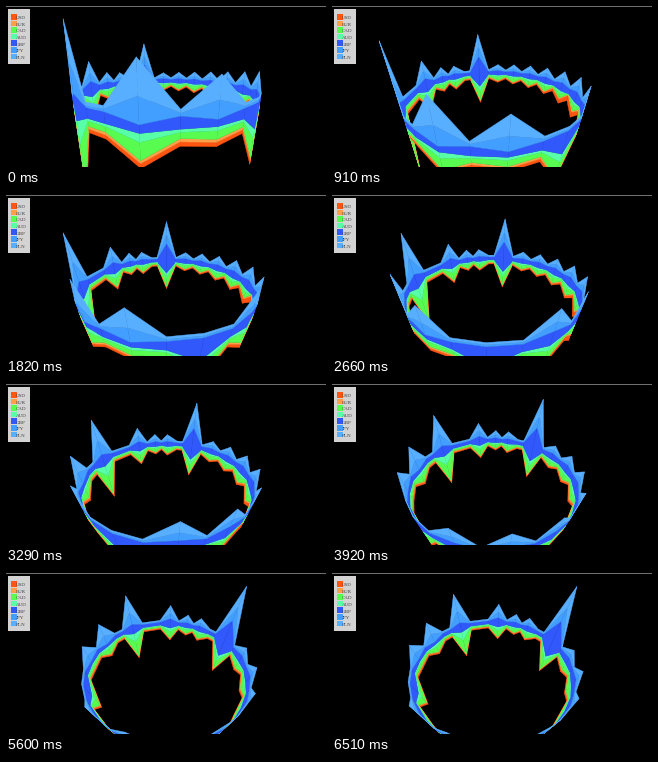
Animation of 320x161 px, one loop 7210 ms. Source, as a matplotlib script:

```python
import numpy as np
import matplotlib.pyplot as plt
from matplotlib.animation import FuncAnimation
from matplotlib.collections import PolyCollection
from matplotlib.patches import Rectangle

W, H, DPI = 320, 161, 100
FRAMES, STEP = 103, 70
FOCAL, DIST = 110, 1.53
CX, CY = 160.5, 80.5
REACH = 12  # widest half base of a spike, degrees

NAMES = ["USD", "EUR", "CAD", "AUD", "GBP", "JPY", "PLN"]
COLORS = ["#ff5511", "#ff9f4a", "#58fb50", "#58ffa8", "#3058fa", "#429eff", "#58aeff"]

# angle, rise, drop, share of blue
SPIKES = [
    (-168, .17, .03, -.2),
    (-144, .25, .14, -.2),
    (-111, .51, .63, .12),
    (-66, .29, .28, .25),
    (-46, .14, .10, .2),
    (-31, .13, .14, .2),
    (0, .71, .59, .46),
    (168, .00, .33, .4),
]
SPIKES += [(a, .10 + a / 2000, .08 + a / 2000, .2) for a in range(24, 150, 20)]
SPIKES.sort()

# camera path: step, turn, elevation
PATH = np.array([
    (0, -28, 9), (13, -17, 19.5), (26, 0, 21.5), (38, 14, 24),
    (56, 50, 33), (69, 68.5, 39), (88, 72, 41.6), (91, 72, 41.6), (93, 72.8, 42),
])


def build_ring():
    """Angles of all spikes and valleys, and the layer bounds there."""
    knots = []
    first = SPIKES[0]
    for cur, nxt in zip(SPIKES, SPIKES[1:] + [(first[0] + 360,) + first[1:]]):
        reach = min((nxt[0] - cur[0]) / 2, REACH)
        knots += [cur, (cur[0] + reach, 0, 0, 0)]
        if reach == REACH and nxt[0] - cur[0] > 2 * REACH:
            knots.append((nxt[0] - reach, 0, 0, 0))
    knots.append((first[0] + 360,) + first[1:])

    angle, rise, drop, share = np.array(knots, float).T
    top = .045 + rise
    bottom = -.155 - drop
    blue_top = .01 + share * rise
    blue_low = -.06 - np.abs(share) * drop
    red = bottom + .025 + .04 * drop + .05 * np.exp(-((angle - 115) / 20) ** 2)
    orange = red + .018
    green = blue_low - .32 * (blue_low - orange)
    sky = blue_top + .45 * (top - blue_top)
    return angle, np.array([bottom, red, orange, green, blue_low, blue_top, sky, top])


ANGLES, BOUNDS = build_ring()


def project(turn, tilt):
    theta = np.radians(ANGLES + turn)
    s, c = np.sin(np.radians(tilt)), np.cos(np.radians(tilt))
    depth = DIST + np.cos(theta) * c - BOUNDS * s
    x = CX + FOCAL * np.sin(theta) / depth
    y = CY - FOCAL * (BOUNDS * c + np.cos(theta) * s) / depth
    return np.stack([x, y], axis=-1), np.cos((theta[:-1] + theta[1:]) / 2)


fig = plt.figure(figsize=(W / DPI, H / DPI), dpi=DPI, facecolor="black")
ax = fig.add_axes([0, 0, 1, 1])
ax.set_xlim(0, W)
ax.set_ylim(H, 0)
ax.axis("off")

ring = PolyCollection([], linewidths=.3)
ax.add_collection(ring, autolim=False)

ax.add_patch(Rectangle((0, 0), W, 1, fc="#707070", ec="none"))
ax.add_patch(Rectangle((2, 3), 22, 55, fc="#d3d3d3", ec="none", zorder=3))
for i, (name, color) in enumerate(zip(NAMES, COLORS)):
    y = 10.8 + 6.6 * i
    ax.add_patch(Rectangle((5, y - 2.8), 5.5, 5.6, fc=color, ec="none", zorder=4))
    ax.text(10, y + 1.3, name, family="Liberation Serif", size=3.6,
            color="#404040", va="center", zorder=5)


def draw(step):
    turn, tilt = (np.interp(step, PATH[:, 0], PATH[:, k]) for k in (1, 2))
    pts, far = project(turn, tilt)
    quads = np.stack([pts[:-1, :-1], pts[:-1, 1:], pts[1:, 1:], pts[1:, :-1]], axis=2)
    order = np.argsort(-far, kind="stable")
    shades = COLORS * len(order)
    ring.set_verts(quads[:, order].transpose(1, 0, 2, 3).reshape(-1, 4, 2))
    ring.set_facecolor(shades)
    ring.set_edgecolor(shades)
    return [ring]


anim = FuncAnimation(fig, draw, frames=FRAMES, interval=STEP, repeat=True,
                     repeat_delay=0)
plt.show()
```
